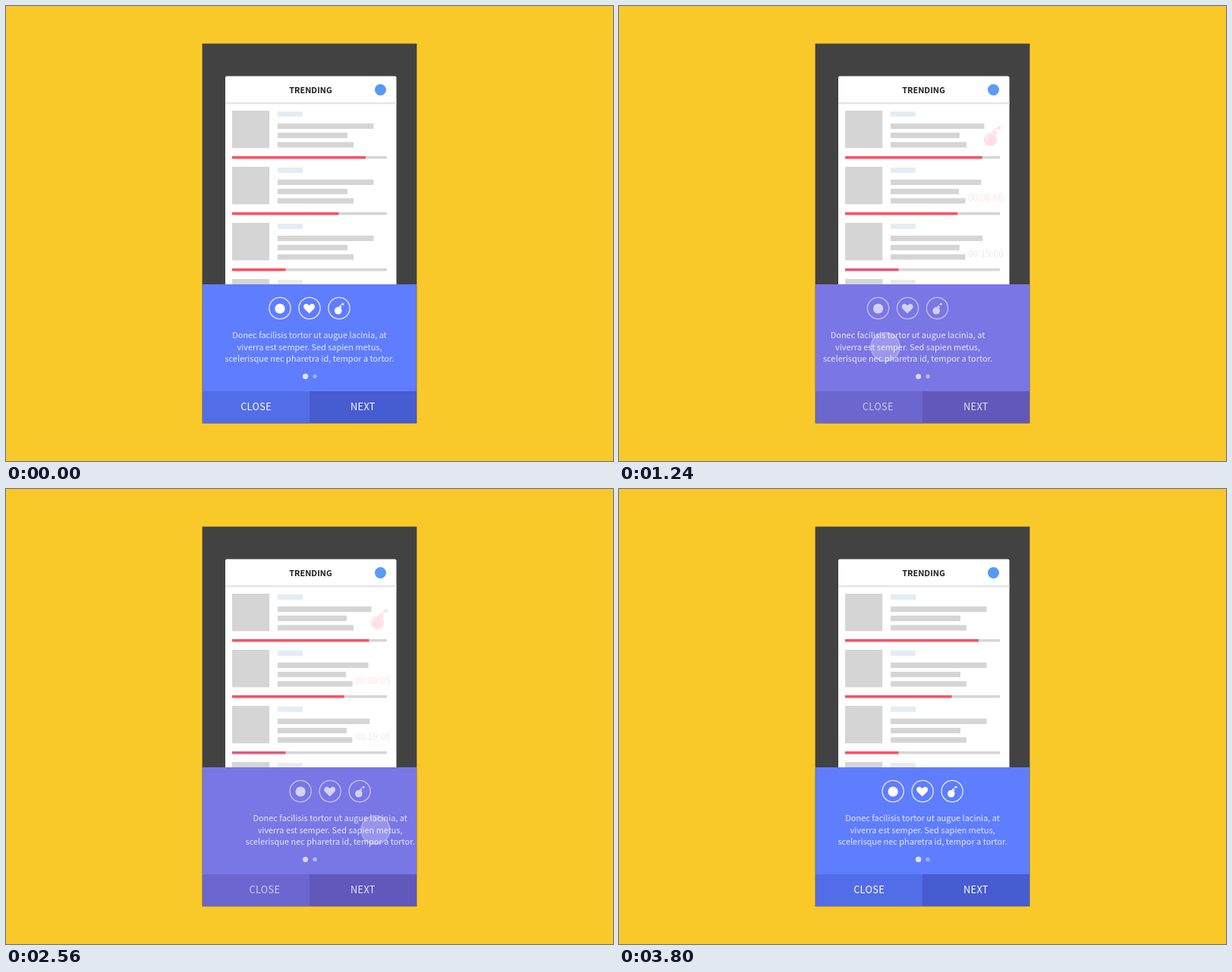
These frames come from a looping animation (800x600 px, 3840 ms). An HTML page:

```html
<!DOCTYPE html>
<html lang="en">
<head>
<meta charset="utf-8">
<title>Trending onboarding</title>
<style>
html, body { margin: 0; width: 100%; height: 100%; overflow: hidden; background: #f9c929; }
svg { display: block; width: 800px; height: 600px; }
text { font-family: "Noto Sans CJK SC", "Noto Sans CJK JP", "Noto Sans CJK", "Noto Sans", sans-serif; text-anchor: middle; }
.copy { font-size: 10.95px; fill: #fff; fill-opacity: .82; }
.button { font-size: 12.8px; font-weight: 500; letter-spacing: .3px; fill: #fff; }
.timer { font-size: 11.1px; font-weight: 500; }
</style>
</head>
<body>
<svg viewBox="0 0 800 600">
  <defs>
    <clipPath id="screen"><rect x="259" y="50" width="282" height="500"/></clipPath>
    <clipPath id="above"><rect x="259" y="50" width="282" height="317"/></clipPath>
    <g id="bomb">
      <circle r="8"/>
      <path d="M1.2 -9.2L3.6 -11.4L8.2 -8.6L6.6 -5.6Z"/>
      <path d="M5 -10.5Q5.5 -14 9 -13.6" fill="none" stroke="currentColor" stroke-width="1.3"/>
      <path d="M10.5 -17.6L11.4 -15.8L13.4 -16L12.4 -14.3L13.4 -12.6L11.4 -12.8L10.5 -11L9.6 -12.8L7.6 -12.6L8.6 -14.3L7.6 -16L9.6 -15.8Z"/>
    </g>
  </defs>
  <rect width="800" height="600" fill="#f9c929"/>
  <rect x="258.5" y="49.5" width="283" height="501" rx="1" fill="#424242" stroke="#b3922f"/>
  <g clip-path="url(#above)">
    <rect x="289" y="92.5" width="225.5" height="290" rx="2" fill="#fff"/>
    <rect x="289" y="127" width="225.5" height="2.4" fill="#e5e5e5"/>
    <text x="401.5" y="114.7" font-size="10.9" font-weight="700" fill="#1c1c1c">TRENDING</text>
    <circle id="badge" cx="493.5" cy="110.5" r="7.5" fill="#5599f5"/>
    <g id="rows"></g>
    <g id="blast" fill="#ff5064" color="#ff5064">
      <use href="#bomb"/>
      <path d="M-5.2 1A5.3 5.3 0 0 1 -1 -5.2" fill="none" stroke="#fff" stroke-opacity=".75" stroke-width="1.1"/>
    </g>
    <text class="timer" id="soon" fill="#f4505f">00:00:05</text>
    <text class="timer" id="later" fill="#5b80e0">00:19:00</text>
  </g>
  <g clip-path="url(#screen)">
    <rect id="panel" x="259" y="367" width="282" height="141"/>
    <rect id="left" x="259" y="508" width="141" height="42"/>
    <rect id="right" x="400" y="508" width="141" height="42"/>
    <g id="page">
      <g id="trio" fill="#fff" color="#fff">
        <g fill="none" stroke="#fff" stroke-opacity=".85" stroke-width="1.3">
          <circle cx="361" cy="398.5" r="14.1"/>
          <circle cx="400" cy="398.5" r="14.1"/>
          <circle cx="439" cy="398.5" r="14.1"/>
        </g>
        <circle cx="361" cy="399" r="6.6"/>
        <path d="M399.6 405.6L393.4 399.4C390.2 395.8 393.8 391.2 397.6 393.2L399.6 395L401.6 393.2C405.4 391.2 409 395.8 405.8 399.4Z"/>
        <use href="#bomb" transform="translate(437.7 401.8) scale(.6)"/>
      </g>
      <g id="clock" fill="none" stroke="#fff" stroke-width="2.3">
        <circle cx="400" cy="399.5" r="14.2"/>
        <path d="M394.6 391.6L400.4 400.6L400.4 392.4" stroke-width="1.9"/>
      </g>
      <text class="copy" x="400" y="438">Donec facilisis tortor ut augue lacinia, at</text>
      <text class="copy" x="400" y="453.5">viverra est semper. Sed sapien metus,</text>
      <text class="copy" x="400" y="469">scelerisque nec pharetra id, tempor a tortor.</text>
    </g>
    <circle id="dotA" cx="394.6" cy="488.4" fill="#fff"/>
    <circle id="dotB" cy="488.4" fill="#fff"/>
    <text class="button" id="close" y="532.8">CLOSE</text>
    <text class="button" id="next" x="470.4" y="532.8">NEXT</text>
    <text class="button" id="done" y="532.8">DONE</text>
    <circle id="touch" cy="449.5" r="19" fill="#fff" fill-opacity=".25" stroke="#fff" stroke-opacity=".3" stroke-width="1.6"/>
  </g>
</svg>
<script>
const LOOP = 3840;
const BLUE = [95, 125, 255], RED = [255, 80, 100];
const byId = id => document.getElementById(id);
const set = (el, attrs) => { for (const k in attrs) el.setAttribute(k, attrs[k]); };
const clamp = v => Math.min(1, Math.max(0, v));
const span = (t, a, b) => clamp((t - a) / (b - a));
const lerp = (a, b, p) => a + (b - a) * p;
const mix = (a, b, p) => `rgb(${a.map((v, i) => Math.round(lerp(v, b[i], p)))})`;
const sine = p => (1 - Math.cos(Math.PI * p)) / 2;
const quad = p => p < .5 ? 2 * p * p : 1 - 2 * (1 - p) ** 2;

// Right edges of the three text lines and the progress bar: [first page, second page]
const ROWS = [
  [[484.5, 466], [450, 443], [458, 458], [474, 502]],
  [[484.5, 441.5], [450, 438], [458, 449.5], [438.5, 484.5]],
  [[484.5, 452], [450, 443.5], [458, 447.5], [368.5, 368.5]]
];
const TOPS = [154.8, 167, 179.4, 198];
const GREY = '#d5d5d5';
const rowsBox = byId('rows');
const bars = [];

function rect(x, y, width, height, fill) {
  const el = document.createElementNS('http://www.w3.org/2000/svg', 'rect');
  set(el, { x, y, width, height, fill });
  return rowsBox.appendChild(el);
}

for (let i = 0; i < 4; i++) {
  const dy = i * 74;
  rect(298, 138 + dy, 49.2, 49.4, GREY);
  rect(358, 139 + dy, 33, 7, i < 3 ? '#e4edf5' : '#ebebeb');
  if (i === 3) break;
  rect(298, 198 + dy, 204, 3.5, GREY);
  ROWS[i].forEach((ends, j) => {
    const progress = j === 3, x = progress ? 298 : 358;
    const el = rect(x, TOPS[j] + dy, 0, progress ? 3.5 : 7.2, progress ? '#ff5064' : GREY);
    bars.push({ el, x, ends });
  });
}
const lastProgress = bars[bars.length - 1].el;

const ui = {};
for (const id of ['badge', 'blast', 'soon', 'later', 'panel', 'left', 'right', 'page', 'trio',
  'clock', 'dotA', 'dotB', 'close', 'next', 'done', 'touch']) ui[id] = byId(id);

// Pull the page by `peak`, then let it settle exponentially.
function pull(t, start, release, peak) {
  return t < release
    ? peak * sine(span(t, start, release))
    : peak * Math.exp(-(t - release) / 220);
}

function pop(el, x, y, p) {
  const q = 1 - p;
  set(el, { transform: `translate(${x + 3.4 * q} ${y - 2.6 * q}) scale(${1 + .1 * q})`, opacity: p });
}

function draw(t) {
  const p = quad(span(t, 1120, 1540)) - quad(span(t, 2260, 2680));
  const shift = t < 1862 ? pull(t, 560, 1080, -40.5) : pull(t, 1862, 2450, 45);
  const late = clamp(2 * p - 1), early = clamp(1 - 2 * p);

  for (const { el, x, ends } of bars) set(el, { width: lerp(ends[0], ends[1], p) - x });
  set(lastProgress, { fill: mix(RED, BLUE, p) });
  set(ui.badge, { opacity: 1 - .65 * p * p });
  pop(ui.blast, 486.7, 178.4, p);
  pop(ui.soon, 480.4, 259.4, p);
  pop(ui.later, 480.4, 333.4, p);

  const done = [240, 68, 84];
  set(ui.panel, { fill: mix(BLUE, RED, p) });
  set(ui.left, { fill: mix([82, 109, 232], done, p) });
  set(ui.right, { fill: mix([70, 92, 208], done, p) });
  set(ui.page, { transform: `translate(${shift} 0)` });
  set(ui.trio, { opacity: early });
  set(ui.clock, { opacity: late });

  set(ui.dotA, { r: lerp(3.7, 2.5, p), opacity: lerp(.78, .4, p) });
  set(ui.dotB, { cx: lerp(407, 407.8, p), r: lerp(2.6, 3.6, p), opacity: lerp(.4, .85, p) });
  const x = lerp(329.6, 400, p);
  set(ui.close, { x, opacity: early });
  set(ui.done, { x, opacity: late });
  set(ui.next, { opacity: 1 - p });

  const go = sine(span(t, 480, 1140)), back = sine(span(t, 1900, 2560));
  set(ui.touch, {
    cx: 487 - 136 * (go - back),
    opacity: span(t, 160, 480) * (1 - span(t, 2540, 2820))
  });
}

const begin = performance.now();
function tick() {
  draw((performance.now() - begin) % LOOP);
  requestAnimationFrame(tick);
}
draw(0);
requestAnimationFrame(tick);
</script>
</body>
</html>
```
